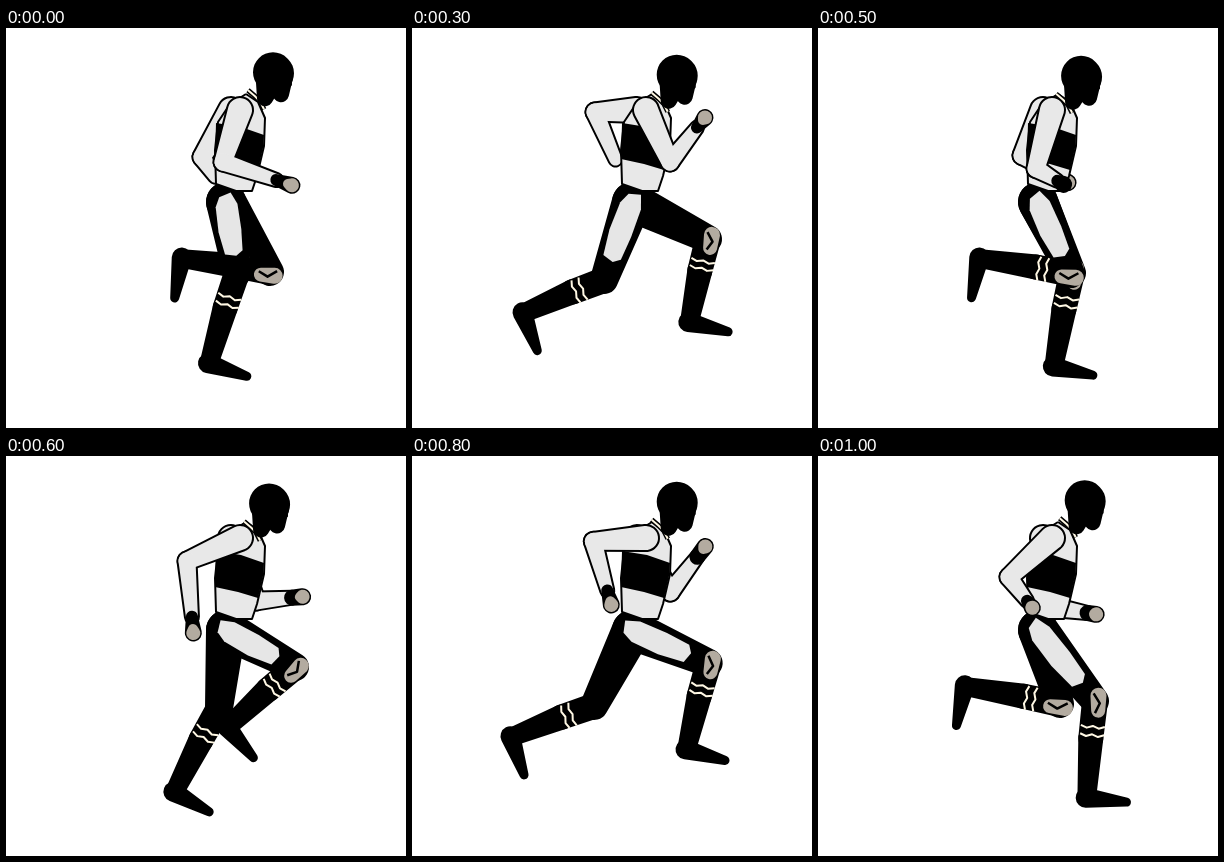
An HTML page with a canvas that plays this animation: 400x400 px, repeating every 1100 ms.

```html
<!DOCTYPE html>
<html lang="en">
<head>
<meta charset="utf-8">
<title>Runner</title>
<style>
html, body { margin: 0; width: 100%; height: 100%; overflow: hidden; background: #fff; }
canvas { display: block; width: 100vw; height: 100vh; }
</style>
</head>
<body>
<canvas id="stage" width="400" height="400"></canvas>
<script>
const ctx = document.getElementById('stage').getContext('2d');
const STEP = 100, STEPS = 11, HALF = STEPS / 2;
const BLACK = '#000', WHITE = '#e8e8e8', SKIN = '#b3aba0', CREAM = '#fff8e4';
const HIP = [220, 174];

// One stride, shared by both sides half a cycle apart.
// Each key: phase, then the middle joint (x, y) and the end joint (x, y).
const LEG = [
  [0, 231, 245, 204, 332], [.5, 213, 252, 170, 333], [1.5, 194, 245, 118, 304],
  [2.5, 182, 250, 102, 280], [3, 192, 252, 114, 284], [3.5, 203, 253, 118, 224],
  [4, 231, 250, 136, 231], [5.5, 264, 244, 179, 231], [6, 289, 211, 224, 269],
  [7, 298, 199, 270, 289], [8.5, 296, 211, 278, 291], [9, 289, 237, 307, 326],
  [9.5, 272, 245, 269, 335], [10, 277, 245, 269, 338]
];
const ARM = [
  [0, 217, 134, 282, 156], [.5, 250, 145, 294, 141], [1.5, 259, 140, 292, 95],
  [3, 258, 134, 291, 92], [3.5, 256, 132, 276, 125], [4, 228, 137, 272, 158],
  [4.5, 240, 152, 276, 158], [5.5, 196, 129, 212, 153], [6, 181, 105, 187, 173],
  [7, 178, 88, 179, 152], [8.5, 183, 84, 208, 142], [9, 182, 95, 202, 147],
  [10, 191, 121, 213, 150]
];

const mix = (a, b, t) => a.map((v, i) => v + (b[i] - v) * t);

function joints(keys, phase) {
  const p = phase % STEPS, n = keys.findLastIndex(k => k[0] <= p);
  const from = keys[n], to = keys[n + 1] || [STEPS, ...keys[0].slice(1)];
  const [, x1, y1, x2, y2] = mix(from, to, (p - from[0]) / (to[0] - from[0]));
  return [[x1, y1], [x2, y2]];
}

// Point at fraction t from a to b, moved sideways (positive is the front of a hanging limb)
function along(a, b, t, side = 0) {
  const dx = b[0] - a[0], dy = b[1] - a[1], len = Math.hypot(dx, dy);
  return [a[0] + dx * t + dy / len * side, a[1] + dy * t - dx / len * side];
}

// Hull of two circles
function taper(color, a, ra, b, rb) {
  const dx = b[0] - a[0], dy = b[1] - a[1];
  const dir = Math.atan2(dy, dx), spread = Math.acos((ra - rb) / Math.hypot(dx, dy));
  ctx.fillStyle = color;
  ctx.beginPath();
  ctx.arc(...a, ra, dir + spread, dir - spread + 2 * Math.PI);
  ctx.arc(...b, rb, dir - spread, dir + spread);
  ctx.fill();
}

function trace(points) {
  ctx.beginPath();
  points.forEach(p => ctx.lineTo(...p));
}

function line(color, width, points) {
  trace(points);
  ctx.strokeStyle = color;
  ctx.lineWidth = width;
  ctx.stroke();
}

function shape(color, points) {
  trace(points);
  ctx.closePath();
  ctx.fillStyle = color;
  ctx.fill();
}

function sock(knee, ankle, t) {
  const wave = [-12, -6, 0, 6, 12].map((side, i) => along(knee, ankle, t + (i % 2 ? .012 : -.012), side));
  line(CREAM, 2, wave);
}

function leg(phase, near) {
  const [knee, ankle] = joints(LEG, phase);
  const calf = along(knee, ankle, .4, -1), heel = along(knee, ankle, 1.04, -1);
  taper(BLACK, HIP, 20, knee, 14);
  taper(BLACK, knee, 13, calf, 12.5);
  taper(BLACK, calf, 12.5, ankle, 9.5);
  taper(BLACK, heel, 10, along(knee, ankle, 1.05, 40), 4.5);
  if (knee[0] > HIP[0] + 10 && phase) {
    taper(SKIN, along(knee, ankle, -.06, 3), 8, along(knee, ankle, .1, 4), 7);
    line(BLACK, 2.5, [along(knee, ankle, -.08, -2), along(knee, ankle, .02, 5), along(knee, ankle, .13, 1)]);
  }
  sock(knee, ankle, .28);
  sock(knee, ankle, .37);
  if (near) {
    shape('#e6e6e6', [[-.12, 6], [.05, 11], [.4, 11], [.7, 9], [.76, 2], [.72, -9], [.4, -12], [.05, -11], [-.08, -6]]
      .map(([t, side]) => along(HIP, knee, t, side)));
  }
}

function arm(phase, shoulder, near) {
  const [elbow, hand] = joints(ARM, phase), wrist = along(elbow, hand, .82);
  const sleeve = (color, grow) => {
    taper(color, shoulder, 13 + grow, elbow, 9.5 + grow);
    taper(color, elbow, 9.5 + grow, wrist, 7 + grow);
  };
  sleeve(BLACK, 1);
  sleeve(WHITE, -1);
  if (near || hand[0] > HIP[0]) {
    const tip = along(elbow, hand, 1.06);
    taper(BLACK, wrist, near ? 6 : 8, tip, 8.5);
    taper(SKIN, hand, 5, tip, 7);
  }
}

function torso() {
  const body = [[240, 66], [252, 74], [259, 90], [258, 118], [251, 148], [246, 163], [230, 163], [210, 156], [209, 122], [212, 94], [224, 76]];
  shape(WHITE, body);
  shape(BLACK, [[210, 95], [235, 99], [258, 107], [257, 120], [252, 142], [232, 136], [209, 131]]);
  line(BLACK, 2, [...body, body[0]]);
}

function head(x, y) {
  const at = (dx, dy) => [x + dx, y + dy];
  const collar = [at(-25, 14), at(-18, 20), at(-13, 25), at(-9, 33)];
  line(BLACK, 5, collar);
  line(CREAM, 2, collar);
  taper(BLACK, at(-4, 6), 13, at(-8, 22), 8);
  taper(BLACK, at(0, -4), 20, at(1, -3), 20);
  taper(BLACK, at(4, 0), 16, at(8, 18), 8);
  taper(BLACK, at(13, 3), 5, at(17, 8), 2);
}

function draw(step) {
  const turn = 2 * Math.PI / STEPS;
  ctx.fillStyle = '#fff';
  ctx.fillRect(0, 0, 400, 400);
  arm(step + HALF, [225, 82], false);
  leg(step + HALF, false);
  leg(step, true);
  torso();
  arm(step, [234, 82], true);
  head(265 + 2 * Math.cos(turn * step), 50 - 1.8 * Math.cos(turn * (step + .5)));
}

ctx.lineJoin = 'round';
function tick(now) {
  draw(Math.floor(now / STEP) % STEPS);
  requestAnimationFrame(tick);
}
draw(0);
requestAnimationFrame(tick);
</script>
</body>
</html>
```
